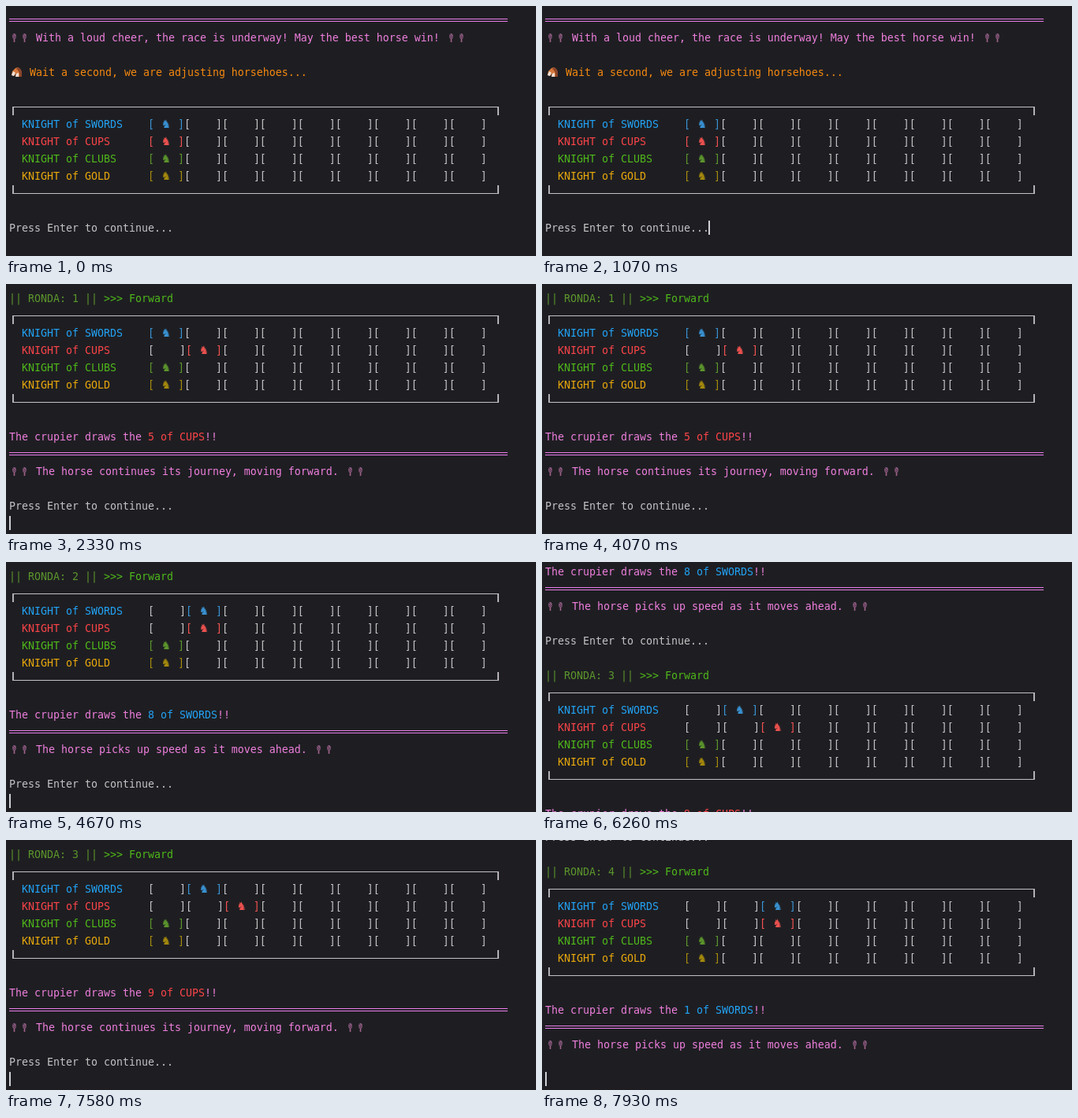
Write an HTML page that moves like this. It is 672 by 318 pixels and loops after 8000 ms.

```html
<!DOCTYPE html>
<html lang="en">
<head>
<meta charset="utf-8">
<title>Horse race in a terminal</title>
<style>
  html, body { margin: 0; width: 100%; height: 100%; overflow: hidden; background: #1e1e22; }
  #screen { position: relative; width: 100%; height: 100%; overflow: hidden; contain: strict; }
  #log { position: absolute; left: 0; top: 7px; }
  .row {
    position: relative; width: 664px; height: 22px; padding-left: 4px; white-space: pre;
    font: 13.29px/24px "DejaVu Sans Mono", "Noto Sans Mono", monospace; color: #c4c2c5;
  }
  .rule, .top, .bottom { position: absolute; box-sizing: border-box; }
  .rule { left: 4px; top: 9px; width: 632px; height: 4px; border: solid #ed7eed; border-width: 1px 0; }
  .top, .bottom { left: 8px; width: 617px; height: 11px; border: solid #b4b0b4; }
  .top { top: 11px; border-width: 1px 2px 0; border-top-color: #c2c2c6; }
  .bottom { top: 1px; border-width: 0 2px 1px; border-bottom-color: #c2c2c6; }
  .knight {
    display: inline-block; width: 14px; text-align: center;
    font: 14px/0 "DejaVu Sans", sans-serif;
  }
  svg { vertical-align: -2px; }
  #cursor { position: absolute; width: 2px; height: 18px; background: #ced0d6; }
</style>
</head>
<body>
<div id="screen"><div id="log"><div id="cursor"></div></div></div>
<script>
const ROW = 22, LOOP = 8000;
const PINK = '#ee7edc', ORANGE = '#f5880f';
const suits = [
  { name: 'SWORDS', bright: '#22a2f4', dim: '#3993d4' },
  { name: 'CUPS', bright: '#fa4448', dim: '#f0524f' },
  { name: 'CLUBS', bright: '#4fb81a', dim: '#5c962c' },
  { name: 'GOLD', bright: '#e8a80c', dim: '#a68a0d' },
];

const log = document.getElementById('log');
const cursor = document.getElementById('cursor');
const rows = [];

const ink = (color, text) => `<span style="color:${color}">${text}</span>`;

const mic = `<svg width="13" height="14"><ellipse cx="6.5" cy="5.5" rx="2.3" ry="3.5" fill="#8c5a80"/>
<path d="M5 3l3 4M5 6l2 2" stroke="#4b3346"/><path d="M6.5 9v4" stroke="#a0628a" stroke-width="1.6"/></svg>`;
const mics = mic + mic;

const horse = `<svg width="18" height="16" style="vertical-align:-3px">
<path d="M8 3l3-1q5 2 5 8v4H8l1-4-3 3-3-1 1-5z" fill="#d8783a"/>
<path d="M11 2q5 2 5 8v4h-3q1-7-4-10z" fill="#8a4428"/>
<path d="M5 7l3 2-2 4-3-1zM9 10l3-1v5H8z" fill="#eee0d8"/></svg>`;

function print(html = '') {
  const row = document.createElement('div');
  row.className = 'row';
  row.innerHTML = html;
  log.append(row);
  rows.push(row);
}

const mark = kind => print(`<div class="${kind}"></div>`);

function lane(suit, place) {
  const mount = ink(suit.dim, '[ <span class="knight">♞\uFE0E</span> ]');
  const cells = Array(9).fill('[    ]');
  cells[place] = mount;
  print('  ' + ink(suit.bright, ('KNIGHT of ' + suit.name).padEnd(20)) + cells.join(''));
}

function table(places) {
  mark('top');
  suits.forEach((suit, i) => lane(suit, places[i]));
  mark('bottom');
  print();
}

function prompt() {
  print('Press Enter to continue...');
  print();
}

function round(number, places, card, suit, news) {
  print(ink('#5c962c', `|| RONDA: ${number} ||`) + ink('#4fb81a', ' &gt;&gt;&gt; Forward'));
  table(places);
  print(ink(PINK, 'The crupier draws the ' + ink(suit.bright, `${card} of ${suit.name}`) + '!!'));
  mark('rule');
  print(mics + ink(PINK, ` ${news} `) + mics);
  print();
  prompt();
}

const [swords, cups] = suits;
const steady = 'The horse continues its journey, moving forward.';
const faster = 'The horse picks up speed as it moves ahead.';

mark('rule');
print(mics + ink(PINK, ' With a loud cheer, the race is underway! May the best horse win! ') + mics);
print();
print(horse + ink(ORANGE, ' Wait a second, we are adjusting horsehoes...'));
print();
table([0, 0, 0, 0]);
prompt();
round(1, [0, 1, 0, 0], 5, cups, steady);
round(2, [1, 1, 0, 0], 8, swords, faster);
round(3, [1, 2, 0, 0], 9, cups, steady);
round(4, [2, 2, 0, 0], 1, swords, faster);

// [start ms, printed lines, cursor on, scroll lag in px]
const LAG = 126;
const states = [
  [0, 13, 0], [1070, 13, 1], [1990, 15, 1],
  [2190, 27, 0, LAG], [2260, 26, 1], [2330, 27, 1], [3070, 27, 0], [3530, 27, 1], [4070, 27, 0],
  [4470, 41, 0, LAG], [4540, 40, 1], [4670, 41, 1], [5600, 41, 0], [6060, 41, 1],
  [6260, 55, 0, LAG], [6330, 54, 1], [6460, 55, 1], [7120, 55, 0], [7580, 55, 1],
  [7860, 69, 0, LAG], [7930, 68, 1],
];

let shown;
function draw(now) {
  const time = now % LOOP;
  const state = states.findLast(s => s[0] <= time);
  if (state !== shown) {
    shown = state;
    const [, lines, on, lag = 0] = state;
    const waiting = lines === 13; // still on the prompt line
    log.style.transform = `translateY(${lag - (lines - 13) * ROW}px)`;
    rows.forEach((row, i) => row.style.visibility = i < lines ? 'visible' : 'hidden');
    cursor.style.visibility = on ? 'visible' : 'hidden';
    cursor.style.left = (waiting ? 211 : 4) + 'px';
    cursor.style.top = (waiting ? 12 : lines) * ROW + 2 + 'px';
  }
  requestAnimationFrame(draw);
}
draw(performance.now());
</script>
</body>
</html>
```
